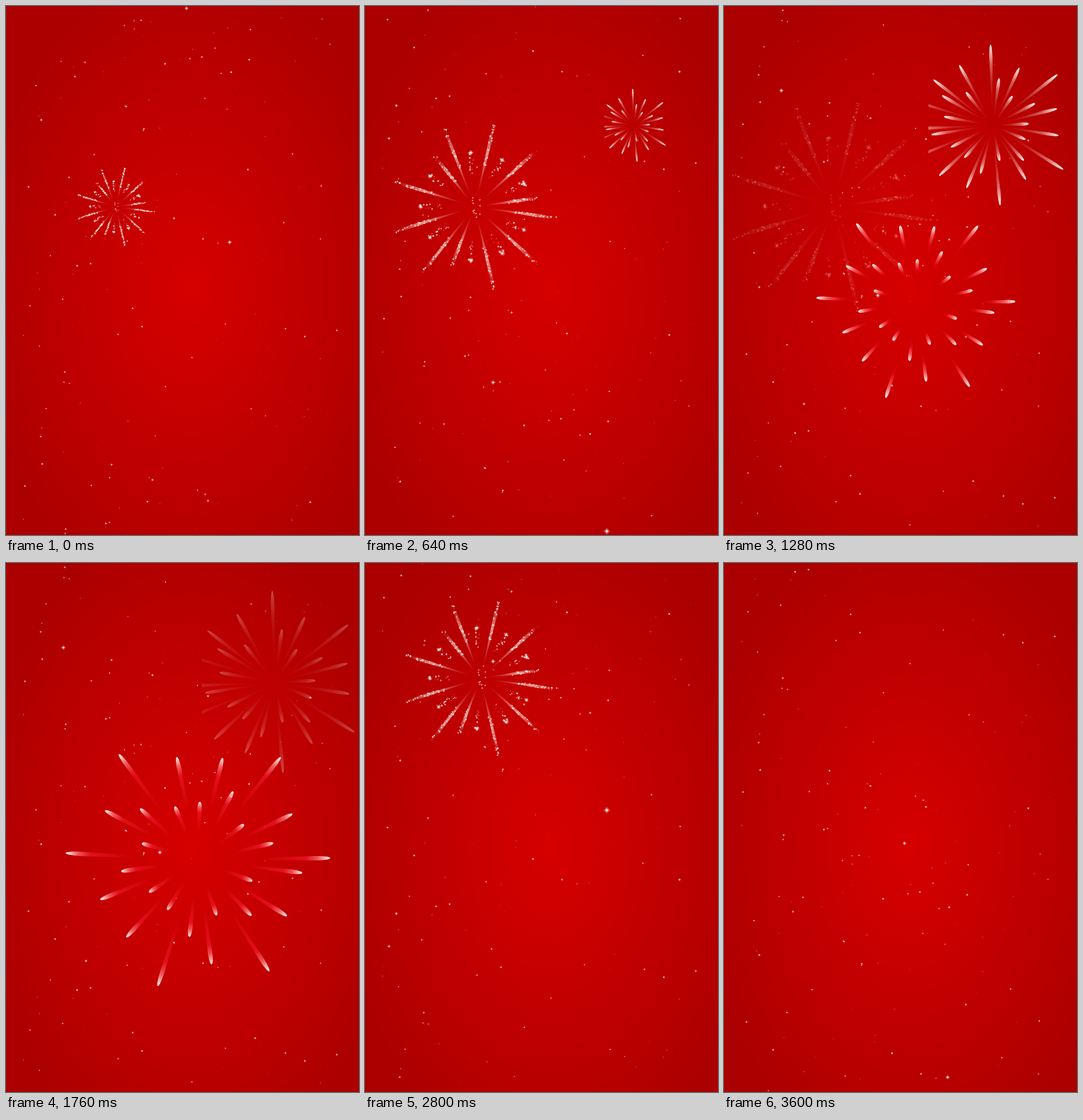
These frames come from a looping animation (611x917 px, 3.68 s). An HTML page with a canvas:

```html
<!DOCTYPE html>
<html lang="en">
<head>
<meta charset="utf-8">
<title>Fireworks</title>
<style>
  html, body { margin: 0; width: 100%; height: 100%; overflow: hidden; }
  body { background: radial-gradient(ellipse 378px 580px at 320px 490px, #d60000 0, #c60000 38%, #b80000 72%, #aa0000 100%); }
  canvas { display: block; }
</style>
</head>
<body>
<canvas id="stage" width="611" height="917"></canvas>
<script>
const W = 611, H = 917, LOOP = 3680, STEP = 80;
const ctx = document.getElementById('stage').getContext('2d');

function seeded(s) {
  return () => {
    s = (s + 0x6D2B79F5) | 0;
    let r = Math.imul(s ^ s >>> 15, 1 | s);
    r = r + Math.imul(r ^ r >>> 7, 61 | r) ^ r;
    return ((r ^ r >>> 14) >>> 0) / 4294967296;
  };
}
const rnd = seeded(11);
const many = (n, make) => Array.from({ length: n }, (_, i) => make(i));
const rad = deg => deg * Math.PI / 180;
const white = a => `rgba(255,238,232,${a})`;

function dot(x, y, r, a) {
  ctx.fillStyle = white(a);
  ctx.beginPath();
  ctx.arc(x, y, r, 0, 7);
  ctx.fill();
}

function spark(x, y, r, a = 1) {
  dot(x, y, r * .7, a * .25);
  dot(x, y, r * .38, a);
  ctx.strokeStyle = white(a * .7);
  ctx.lineWidth = Math.max(.45, r * .15);
  ctx.beginPath();
  for (let i = 0; i < 4; i++) {
    const l = i % 2 ? r * .7 : r;
    const c = Math.cos(rad(45 * i)) * l, s = Math.sin(rad(45 * i)) * l;
    ctx.moveTo(x - c, y - s);
    ctx.lineTo(x + c, y + s);
  }
  ctx.stroke();
}

// ---- Stars: one field that jumps between six heights; the largest twinkle ----
const JUMP = 145, SPOTS = 6;
const field = many(175, i => ({
  x: 30 + rnd() * 552, y: rnd() * H, r: .5 + 2 * rnd() ** 2,
  flare: i % 12 ? 0 : 1 + rnd() * 2.5, beat: i / 12 % 3
}));

function stars(n) {
  const spot = (3 + SPOTS * 8 - n) % SPOTS;
  for (const s of field) {
    const y = (s.y + spot * JUMP) % H;
    const r = s.r + (spot % 3 === s.beat ? s.flare : 0);
    if (r < 1.5) dot(s.x, y, r * .8, .35 + r * .28);
    else spark(s.x, y, r, .9);
  }
}

// ---- Fireworks ----
const grow = (age, tau) => 1 - Math.exp(-age / tau);
const fade = (t, from, to) => Math.max(0, Math.min(1, (to - t) / (to - from)));

// Two rays in every five are long
const ring = (n, start, step, phase, short, long) => many(n, i => ({
  angle: rad(start + step * i),
  len: [1, 3].includes((i + phase) % 5) ? long : short
}));

// Slender blade along the x axis, widest near its far end
function blade(a, b, tail, width, stops) {
  const g = ctx.createLinearGradient(a, 0, b, 0), n = a + (b - a) * .78;
  stops.forEach(([o, c]) => g.addColorStop(o, c));
  ctx.fillStyle = g;
  ctx.beginPath();
  ctx.moveTo(a, -tail / 2);
  ctx.lineTo(n, -width / 2);
  ctx.bezierCurveTo((n + b) / 2, -width / 2, b, -width / 3, b, 0);
  ctx.bezierCurveTo(b, width / 3, (n + b) / 2, width / 2, n, width / 2);
  ctx.lineTo(a, tail / 2);
  ctx.fill();
}

function burst(x, y, alpha, rays, draw) {
  ctx.save();
  ctx.globalAlpha = alpha;
  ctx.translate(x, y);
  for (const ray of rays) {
    ctx.save();
    ctx.rotate(ray.angle);
    draw(ray);
    ctx.restore();
  }
  ctx.restore();
}

// Every seventh ray starts a group: long streaks alternate with short beads
const streaks = many(21, i => {
  const m = i % 7, beads = m % 2 === 1;
  return {
    angle: rad(8 + 17.2 * i), beads,
    len: beads ? 97 : m === 6 ? 112 : 147,
    grains: many(beads ? 16 : 34, () => ({ u: rnd(), v: rnd() - .5, s: rnd() }))
  };
});
const core = many(11, () => ({ angle: rnd() * 6.28, len: 5 + rnd() * 15 }));

function glitter(x, y, age, alpha) {
  const k = 1.55 * grow(age, 955);
  burst(x, y, alpha ** 1.6, streaks, ({ len, beads, grains }) => {
    const L = len * k;
    if (!beads) {
      blade(L * .15, L * .95, k, 6 * k,
        [[0, white(0)], [.3, white(.25)], [.62, white(.6)], [1, white(0)]]);
    }
    for (const { u, v, s } of grains) {
      const p = beads ? .58 + .42 * u : .48 + .52 * u;
      const r = (beads ? .9 + 1.9 * s * u : .6 + 1.3 * s) * Math.sqrt(k);
      const off = v * (beads ? 9 : 5) * k;
      if (s > .5) spark(L * p, off, r * 1.2, .9);
      else dot(L * p, off, r * .6, .65);
    }
    if (beads) spark(L * .97, 0, 4.6 * k);
  });
  burst(x, y, alpha ** 1.6, core, ({ len }) => spark(len * k, 0, 1.6 * k, .85));
}

// Rays wider than high, leaning a little to the left
const needles = [...ring(15, 9, 24, 0, 112, 140), ...ring(14, 284, 24.5, 1, 65, 84)]
  .map(({ angle, len }) => {
    const tx = Math.cos(angle) * len * 1.14 - 12, ty = Math.sin(angle) * len;
    return { angle: Math.atan2(ty, tx), len: Math.hypot(tx, ty) };
  });

function dandelion(x, y, age, alpha) {
  const k = 1.22 * grow(age, 510);
  ctx.save();
  ctx.beginPath();
  ctx.rect(x - 111 * k, 0, W, H);
  ctx.clip();
  burst(x, y, alpha, needles, ({ len }) => blade(len * k * .2, len * k, k, 1 + 4.6 * k,
    [[0, white(0)], [.4, white(.15)], [.7, white(.4)], [.9, white(.8)], [1, '#fff']]));
  ctx.restore();
}

const petals = [...ring(15, 7, 25.15, 4, 211, 265), ...ring(14, 21, 25.1, 0, 117, 155)];

// Tails stay put while the tips travel outwards
function bloom(x, y, age, alpha) {
  const k = 1.15 * grow(age, 860), tail = .42;
  if (k <= tail) return;
  burst(x, y, alpha, petals, ({ len }) => {
    const a = len * tail, b = len * k;
    const tip = Math.max(.35, 1 - len * .16 / (b - a));
    blade(a, b, 4, 1.5 + 7 * k,
      [[0, 'rgba(232,14,30,0)'], [.3, 'rgba(234,16,34,.45)'], [tip, 'rgba(238,24,42,.7)'],
       [(tip + 1) / 2, 'rgba(248,110,112,.8)'], [1, '#fff']]);
  });
}

// draw, x, y, birth, first shown, fade start, fade end
const show = [
  [glitter, 190, 348, -346, 0, 720, 1560],
  [dandelion, 465, 207, 402, 420, 1360, 1920],
  [bloom, 332, 515, 564, 900, 1900, 2720],
  [glitter, 200, 200, 1920, 2240, 2880, 3520]];

function frame() {
  const n = Math.floor(performance.now() % LOOP / STEP), t = n * STEP;
  ctx.clearRect(0, 0, W, H);
  for (const [draw, x, y, birth, first, from, to] of show) {
    if (t >= first && t < to) draw(x, y, t - birth, fade(t, from, to));
  }
  stars(n);
  requestAnimationFrame(frame);
}
frame();
</script>
</body>
</html>
```
